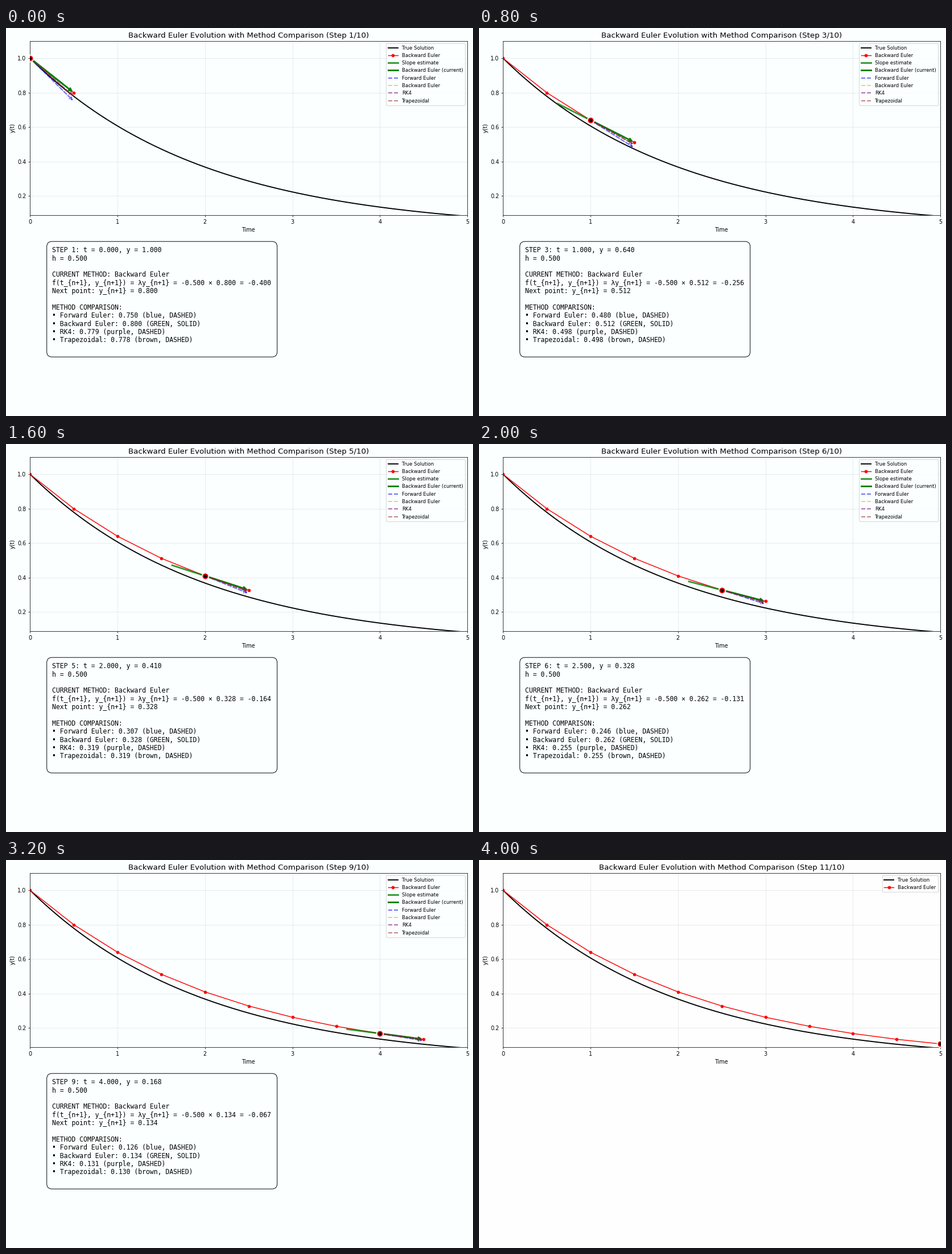
Write a matplotlib script that moves like this. It is 821 px wide and 682 px high and loops after 4.4 s.

```python
import numpy as np
import matplotlib.pyplot as plt
from matplotlib.animation import FuncAnimation
from matplotlib.patches import FancyArrowPatch, FancyBboxPatch

WIDTH, HEIGHT, DPI = 821, 682, 64
K = 69 / DPI  # point sizes below are meant for 69 dpi

for key in ("font.size", "axes.linewidth", "axes.titlepad", "axes.labelpad",
            "grid.linewidth", "patch.linewidth",
            "xtick.major.size", "xtick.major.pad", "xtick.major.width",
            "ytick.major.size", "ytick.major.pad", "ytick.major.width"):
    plt.rcParams[key] *= K

LAM, H, STEPS = -0.5, 0.5, 10
Z = LAM * H
GROWTH = {
    "Forward Euler": 1 + Z,
    "Backward Euler": 1 / (1 - Z),
    "RK4": 1 + Z + Z**2 / 2 + Z**3 / 6 + Z**4 / 24,
    "Trapezoidal": (1 + Z / 2) / (1 - Z / 2),
}
COLORS = {"Forward Euler": "blue", "Backward Euler": "orange",
          "RK4": "purple", "Trapezoidal": "brown"}
CURRENT = "Backward Euler"

times = H * np.arange(STEPS + 1)
values = GROWTH[CURRENT] ** np.arange(STEPS + 1)
fine_t = np.linspace(0, 5, 400)

fig = plt.figure(figsize=(WIDTH / DPI, HEIGHT / DPI), dpi=DPI)


def pixel_axes(left, top, right, bottom):
    return fig.add_axes([left / WIDTH, 1 - bottom / HEIGHT,
                         (right - left) / WIDTH, (bottom - top) / HEIGHT])


def draw_arrow(ax, start, end, color, lw, **style):
    ax.add_patch(FancyArrowPatch(
        start, end, arrowstyle="->", mutation_scale=12 * K, color=color,
        lw=lw * K, shrinkA=2 * K, shrinkB=2 * K, zorder=3, **style))


def draw_step(ax, n):
    t, y, slope = times[n], values[n], LAM * values[n + 1]
    reach = np.array([-0.375, 0.375])
    ax.plot(t + reach, y + slope * reach, color="green", lw=3 * K, alpha=0.8,
            label="Slope estimate")
    ax.plot([], [], color="green", lw=3 * K, label=f"{CURRENT} (current)")
    for name, color in COLORS.items():
        ax.plot([], [], "--", color=color, lw=2 * K, alpha=0.6, label=name)
        end = (t + H, y * GROWTH[name])
        if name == CURRENT:
            draw_arrow(ax, (t, y), end, "green", 3)
        else:
            draw_arrow(ax, (t, y), end, color, 2, linestyle="--", alpha=0.6)


def draw_chart(n, background):
    ax = pixel_axes(42.2, 22.8, 811.2, 329)
    ax.set_facecolor(background)
    ax.plot(fine_t, np.exp(LAM * fine_t), "k", lw=2 * K, label="True Solution")
    ax.plot(times[:n + 2], values[:n + 2], "o-", color="red", lw=1.5 * K,
            ms=5 * K, label="Backward Euler")
    if n < STEPS:
        draw_step(ax, n)
    for size, color in ((14, background), (10.4, "red"), (6.4, "black")):
        ax.plot(times[n], values[n], "o", color=color, ms=size * K, mew=0,
                zorder=6)
    ax.set(xlim=(0, 5), ylim=(0.0885, 1.1),
           xticks=range(6), yticks=[0.2, 0.4, 0.6, 0.8, 1.0],
           xlabel="Time", ylabel="y(t)")
    ax.set_title("Backward Euler Evolution with Method Comparison "
                 f"(Step {n + 1}/{STEPS})", fontsize=14 * K)
    ax.grid(alpha=0.3)
    ax.legend(loc="upper right", fontsize=9 * K,
              facecolor=background).set_zorder(7)


def info_lines(n):
    y = values[n]
    following = values[n + 1]
    lines = [
        f"STEP {n + 1}: t = {times[n]:.3f}, y = {y:.3f}",
        f"h = {H:.3f}",
        "",
        f"CURRENT METHOD: {CURRENT}",
        f"f(t_{{n+1}}, y_{{n+1}}) = λy_{{n+1}} = {LAM:.3f} × "
        f"{following:.3f} = {LAM * following:.3f}",
        f"Next point: y_{{n+1}} = {following:.3f}",
        "",
        "METHOD COMPARISON:",
    ]
    for name, color in COLORS.items():
        style = "GREEN, SOLID" if name == CURRENT else f"{color}, DASHED"
        lines.append(f"• {name}: {y * GROWTH[name]:.3f} ({style})")
    return lines


def draw_info(n):
    panel = pixel_axes(0, 0, WIDTH, HEIGHT)
    panel.set(xlim=(0, WIDTH), ylim=(HEIGHT, 0))
    panel.axis("off")
    panel.add_patch(FancyBboxPatch(
        (71.7, 375.2), 405, 203, boxstyle="round,pad=0,rounding_size=9.2",
        fc="none", ec="black", lw=K))
    for row, line in enumerate(info_lines(n)):
        panel.text(80.9, 394.3 + 14.36 * row, line, va="baseline",
                   family="DejaVu Sans Mono", fontsize=12 * K)


def update(n):
    fig.clear()
    background = "#fbffff" if n < STEPS else "#fefefe"
    fig.set_facecolor(background)
    draw_chart(n, background)
    if n < STEPS:
        draw_info(n)
    return []


anim = FuncAnimation(fig, update, frames=STEPS + 1, interval=400,
                     init_func=lambda: [], repeat=True, repeat_delay=0)
plt.show()
```
